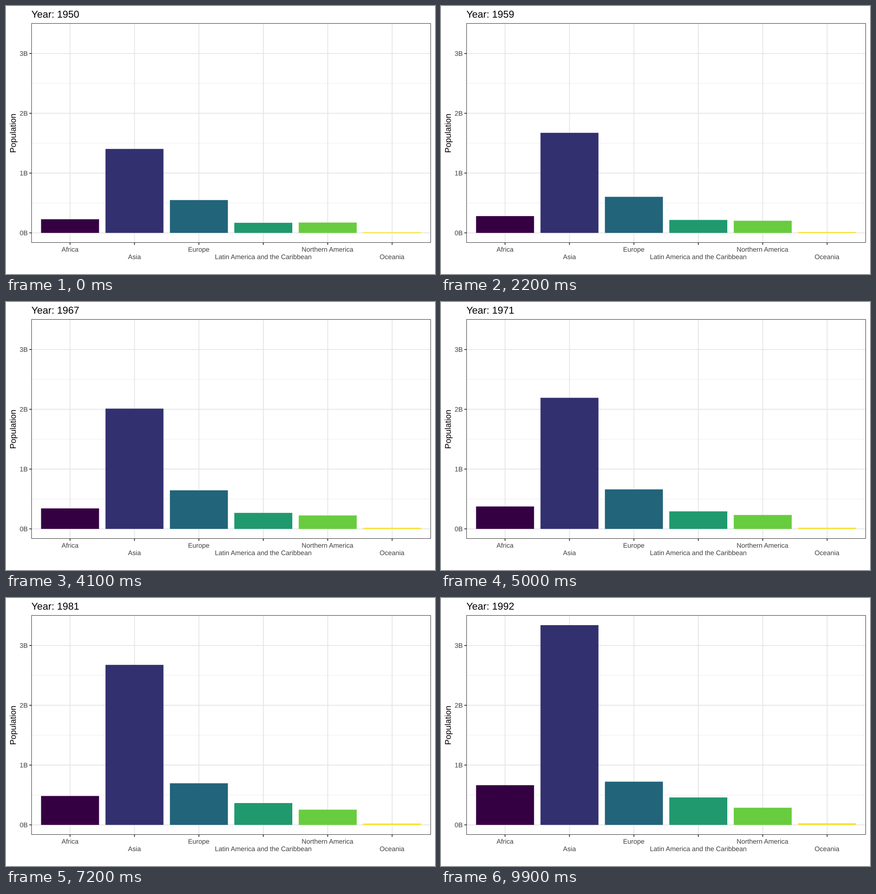
A matplotlib script that plays this animation: 947 by 592 pixels, repeating every 10 s.

```python
import numpy as np
import matplotlib.pyplot as plt
from matplotlib.animation import FuncAnimation
from matplotlib.patches import PathPatch, Rectangle
from matplotlib.textpath import TextPath
from matplotlib.transforms import Affine2D

W, H, DPI = 947, 592, 64
FRAMES, INTERVAL = 100, 100
FIRST, LAST = 1950, 1992

plt.rcParams["font.family"] = "Liberation Sans"

# Panel geometry in pixels, y pointing down
LEFT, TOP, RIGHT, BOTTOM = 56.5, 38.5, 937.5, 522.5
ZERO, PER_BILLION = 501.2, 132.1
FIRST_CENTER, SPACING = 141.4, 142.2
BAR = 0.9 * SPACING

# Name, colour and population in millions at the key years
KEY_YEARS = np.array([1950, 1963, 1975, 1986, 1992])
REGIONS = [
    ("Africa", "#350042", (228, 306, 417, 562, 664)),
    ("Asia", "#333070", (1404, 1805, 2401, 2971, 3340)),
    ("Europe", "#22647a", (549, 623, 677, 711, 723)),
    ("Latin America and the Caribbean", "#20996f", (169, 238, 323, 409, 459)),
    ("Northern America", "#68cc3f", (173, 214, 242, 269, 287)),
    ("Oceania", "#fde31f", (12.7, 16.8, 21.6, 25.2, 28)),
]


def smooth(x, xs, ys):
    """Cubic Hermite curve through the key points."""
    slopes = np.gradient(ys, xs)
    i = min(np.searchsorted(xs, x, side="right"), len(xs) - 1) - 1
    span = xs[i + 1] - xs[i]
    t = (x - xs[i]) / span
    chord = ys[i + 1] - ys[i]
    bend = (1 - t) * (slopes[i] * span - chord) - t * (slopes[i + 1] * span - chord)
    return ys[i] + t * chord + t * (1 - t) * bend


def level(billions):
    return ZERO - PER_BILLION * billions


fig = plt.figure(figsize=(W / DPI, H / DPI), dpi=DPI, facecolor="white")
ax = fig.add_axes([0, 0, 1, 1])
ax.set_xlim(0, W)
ax.set_ylim(H, 0)
ax.axis("off")


def px(size):
    """Pixels to points."""
    return size * 72 / DPI


def line(x, y, color, width, z):
    ax.plot(x, y, color=color, lw=px(width), zorder=z, snap=False,
            solid_capstyle="butt")


def label(x, y, text, size=14.67, color="#404040", align=0.5, angle=0):
    """Text outline with its baseline at y; align runs from 0 (left) to 1 (right)."""
    path = TextPath((0, 0), text, size=size)
    box = path.get_extents()
    place = (Affine2D().translate(-box.x0 - align * box.width, 0)
             .rotate_deg(angle).scale(1, -1).translate(x, y))
    patch = PathPatch(path, fc=color, lw=0, zorder=6, transform=place + ax.transData)
    return ax.add_patch(patch)


for b in (0.5, 1.5, 2.5):
    line([LEFT, RIGHT], [level(b)] * 2, "#ebebeb", 0.9, 1)
for b in range(4):
    y = level(b)
    line([LEFT, RIGHT], [y, y], "#e5e5e5", 1.78, 1)
    line([51.5, LEFT], [y, y], "#333333", 1.78, 4)
    label(47.3, y + 5.2, f"{b}B", align=1)

bars = []
for i, (name, color, _) in enumerate(REGIONS):
    x = FIRST_CENTER + SPACING * i
    line([x, x], [TOP, BOTTOM], "#e5e5e5", 1.78, 1)
    line([x, x], [BOTTOM, 527.6], "#333333", 1.78, 4)
    label(x, 542.7 + 16.4 * (i % 2), name)
    bar = Rectangle((x - BAR / 2, ZERO), BAR, 0, fc=color, lw=0, snap=False, zorder=3)
    bars.append(ax.add_patch(bar))

ax.add_patch(Rectangle((LEFT, TOP), RIGHT - LEFT, BOTTOM - TOP, fill=False,
                       ec="#333333", lw=px(1), snap=False, zorder=5))
label(21.6, 281, "Population", 18.33, "black", angle=90)
title = label(56.5, 25.7, f"Year: {FIRST}", 22, "black", align=0)

# Every year lands on a whole frame; frames in between are interpolated
STEPS = np.arange(LAST - FIRST + 1)
YEAR_FRAMES = np.round(STEPS * (FRAMES - 1) / (LAST - FIRST))


def update(frame):
    year = FIRST + np.interp(frame, YEAR_FRAMES, STEPS)
    for bar, (_, _, millions) in zip(bars, REGIONS):
        top = level(smooth(year, KEY_YEARS, millions) / 1000)
        bar.set_y(top)
        bar.set_height(ZERO - top)
    shown = FIRST + round(frame * (LAST - FIRST) / (FRAMES - 1))
    title.set_path(TextPath((0, 0), f"Year: {shown}", size=22))
    return [*bars, title]


anim = FuncAnimation(fig, update, frames=FRAMES, interval=INTERVAL,
                     init_func=lambda: update(0), repeat=True, repeat_delay=0)
plt.show()
```
